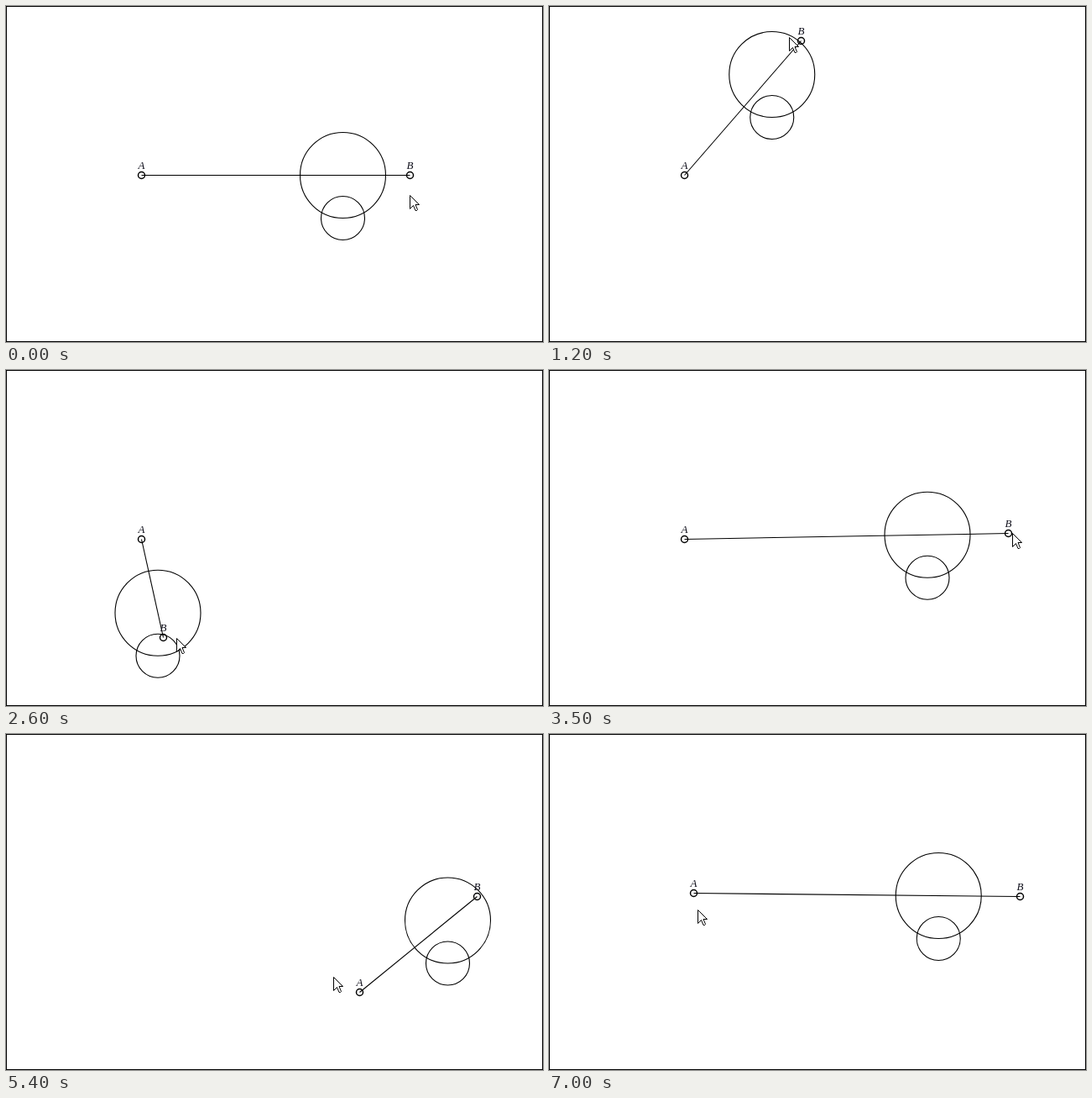
An HTML page that plays this animation: 640x400 px, repeating every 7100 ms.

```html
<!DOCTYPE html>
<html lang="en">
<head>
<meta charset="utf-8">
<title>Dragging a segment</title>
<style>
  html, body { margin: 0; width: 100%; height: 100%; overflow: hidden; background: #fff; }
  svg { display: block; width: 640px; height: 400px; }
  circle, line, rect { fill: none; stroke: #000; stroke-width: 1.1; }
  rect { stroke-width: 1; }
  .dot { stroke-width: 1.5; }
  text { font: italic 13px "Liberation Serif", "Times New Roman", serif; fill: #10101c; text-anchor: middle; }
  #cursor { fill: #fff; stroke: #000; stroke-width: 1; }
</style>
</head>
<body>
<svg viewBox="0 0 640 400">
  <rect x=".5" y=".5" width="639" height="399"/>
  <circle id="big" r="51"/>
  <circle id="small" r="26"/>
  <line id="segment"/>
  <g id="a"><circle class="dot" r="4"/><text y="-7.5">A</text></g>
  <g id="b"><circle class="dot" r="4"/><text y="-7.5">B</text></g>
  <path id="cursor" d="M.5 .5V16.5L4.5 12.5L7 18.5H8.5L9.5 17.5L7 11.5H11.5Z"/>
</svg>
<script>
const STEP = 100, STEPS = 71;

// Turning points of each drag: [step, x, y]
const pathB = [
  [4, 481, 201], [8, 436, 120], [12, 300, 41], [16, 130, 28], [20, 37, 138],
  [23, 56, 256], [26, 187, 318], [29, 325, 306], [35, 547, 194], [36, 561, 193]
];
const pathA = [
  [44, 161, 201], [46, 214, 215], [49, 392, 262], [53, 487, 337], [54, 421, 307],
  [58, 155, 165], [61, 94, 204], [64, 129, 238], [68, 172, 189]
];

const mix = (p, q, u) => p.map((v, i) => Math.round(v + (q[i] - v) * u));
const clamp = u => Math.min(1, Math.max(0, u));

// Smooth curve through the keys, at rest before the first and after the last
function along(keys, t) {
  const last = keys.length - 1;
  if (t <= keys[0][0]) return keys[0].slice(1);
  if (t >= keys[last][0]) return keys[last].slice(1);
  const i = keys.findIndex(k => k[0] > t) - 1;
  const p = keys[i], q = keys[i + 1];
  const span = q[0] - p[0], u = (t - p[0]) / span;
  const slope = (j, axis) => {
    if (j === 0 || j === last) return 0;
    const before = keys[j - 1], after = keys[j + 1];
    return (after[axis] - before[axis]) / (after[0] - before[0]);
  };
  return [1, 2].map(axis => Math.round(
    p[axis] * (1 + 2 * u) * (1 - u) ** 2 +
    q[axis] * u * u * (3 - 2 * u) +
    span * (slope(i, axis) * u * (1 - u) ** 2 - slope(i + 1, axis) * u * u * (1 - u))
  ));
}

// While dragging, the pointer runs ahead of the point it holds
const ahead = (keys, n, lead) => mix(along(keys, n), along(keys, n + 1), lead);

function cursorAt(n) {
  const a = along(pathA, n), b = along(pathB, n);
  if (n < 4) return mix([481, 225], b, clamp(n / 3));
  if (n < 38) return ahead(pathB, n, 0.33);
  if (n < 44) return mix(b, a, (n - 38) / 6);
  if (n < 68) return ahead(pathA, n, 0.45);
  return mix(a, [177, 209], (n - 68) / 2);
}

const el = id => document.getElementById(id);
const set = (id, attrs) => {
  for (const name in attrs) el(id).setAttribute(name, attrs[name]);
};
const move = (id, x, y) => set(id, { transform: `translate(${x} ${y})` });

function draw(n) {
  const [ax, ay] = along(pathA, n).map(v => v + 0.5);
  const [bx, by] = along(pathB, n).map(v => v + 0.5);
  const cx = ax + 0.75 * (bx - ax), cy = ay + 0.75 * (by - ay);
  move("a", ax, ay);
  move("b", bx, by);
  set("segment", { x1: ax, y1: ay, x2: bx, y2: by });
  set("big", { cx, cy });
  set("small", { cx, cy: cy + 51 });
  move("cursor", ...cursorAt(n));
}

const start = performance.now();
function tick() {
  draw(Math.floor((performance.now() - start) / STEP) % STEPS);
  requestAnimationFrame(tick);
}
tick();
</script>
</body>
</html>
```
